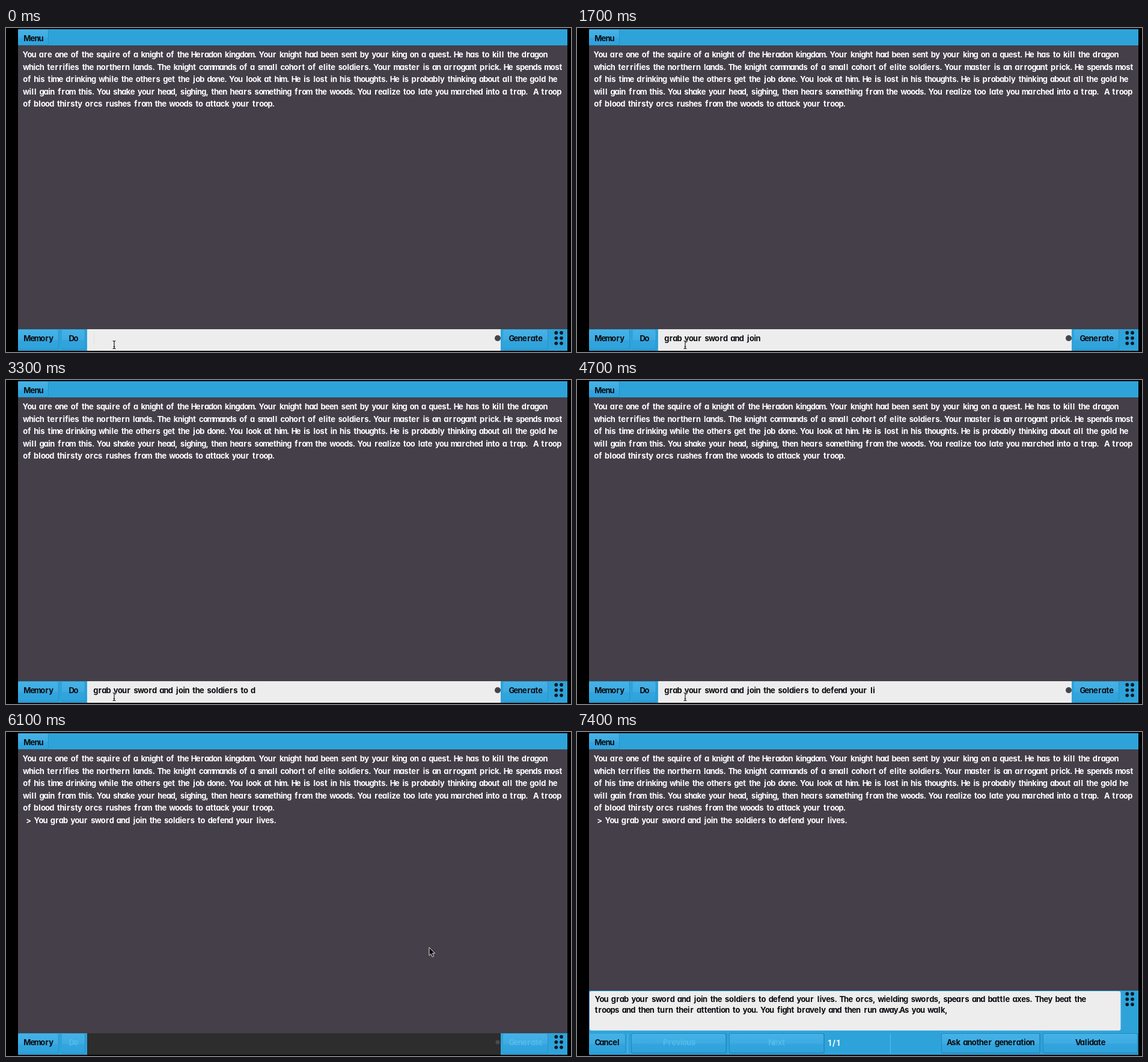
Write an HTML page that moves like this. It is 940 px wide and 540 px high and loops after 9.4 s.

```html
<!DOCTYPE html>
<html lang="en">
<head>
<meta charset="utf-8">
<title>Story generator</title>
<style>
  html, body { margin: 0; width: 100%; height: 100%; overflow: hidden; background: #000; }
  svg { display: block; width: 940px; height: 540px; }
  text {
    font: 700 13px Inter, Roboto, sans-serif;
    font-feature-settings: "cv11", "calt" 0;
    font-variant-ligatures: none;
    text-anchor: middle;
    white-space: pre;
  }
  .light { fill: #fff; }
  .dark { fill: #0b0b10; }
  .off { fill: #55bbeb; }
</style>
</head>
<body>
<svg id="stage" viewBox="0 0 940 540">
  <defs>
    <linearGradient id="gloss" x2="0" y2="1">
      <stop offset="0" stop-color="#45b2e6"/>
      <stop offset=".5" stop-color="#3eace2"/>
      <stop offset=".56" stop-color="#32a5de"/>
      <stop offset="1" stop-color="#2fa2db"/>
    </linearGradient>
  </defs>
  <rect x="20" y="2" width="914" height="536" fill="#443f49"/>
  <rect x="20" y="2" width="914" height="27" fill="#2ea3da"/>
</svg>
<script>
const LOOP = 9400, STEP = 100;
const SUBMIT = 5700, REPLY = 6300, LEAVE = 7200;
const stage = document.getElementById('stage');

// Advance widths of the proportional pixel lettering, in px.
const WIDTHS = [
  [' ', 5.02], ['i.,', 3.5], ['l', 4.5], ['jt', 5], ['f', 5.7],
  ['r', 6.9], ['mw', 9.7], ['M', 11], ['>', 10]
];
const advance = c => (WIDTHS.find(([set]) => set.includes(c)) || [0, 7.18])[1];

function add(parent, tag, attrs) {
  const el = document.createElementNS('http://www.w3.org/2000/svg', tag);
  for (const key in attrs) el.setAttribute(key, attrs[key]);
  parent.append(el);
  return el;
}

const group = () => add(stage, 'g', {});
const show = (el, on) => { el.style.display = on ? '' : 'none'; };

function box(parent, x, y, width, height, fill, rx = 0) {
  return add(parent, 'rect', { x, y, width, height, fill, rx });
}

function label(parent, str, x, y, cls) {
  const xs = [];
  for (const c of str) {
    const w = advance(c);
    xs.push((x + w / 2 - 0.3).toFixed(2));
    x += w;
  }
  const el = add(parent, 'text', { x: xs.join(' '), y, class: cls });
  el.textContent = str;
  return el;
}

function button(parent, x, y, w, h, str, tx, cls = 'dark') {
  box(parent, x, y, w, h, '#2791c6', 2);
  box(parent, x, y, w - 1, h - 1, 'url(#gloss)', 2);
  label(parent, str, tx, y + 19, cls);
}

// Button with a dark rim, as in the reply panel
function framed(parent, x, w, str, tx, cls) {
  box(parent, x - 1, 502, w + 2, 34, '#2488bb', 3);
  button(parent, x, 503, w, 32, str, tx, cls);
}

function dots(parent, top) {
  for (let i = 0; i < 6; i++) {
    add(parent, 'circle', {
      cx: 915.3 + (i % 2) * 8.7, cy: top + (i >> 1) * 8.8, r: 2.9, fill: '#0c1822'
    });
  }
}

// Story text
button(stage, 20, 3, 51, 26, 'Menu', 30);
[
  'You are one of the squire of a knight of the Heradon kingdom. Your knight had been sent by your king on a quest. He has to kill the dragon',
  'which terrifies the northern lands. The knight commands of a small cohort of elite soldiers. Your master is an arrogant prick. He spends most',
  'of his time drinking while the others get the job done. You look at him. He is lost in his thoughts. He is probably thinking about all the gold he',
  'will gain from this. You shake your head, sighing, then hears something from the woods. You realize too late you marched into a trap.  A troop',
  'of blood thirsty orcs rushes from the woods to attack your troop.'
].forEach((line, i) => label(stage, line, 29, 49 + i * 20.5, 'light'));

const ACTION = 'grab your sword and join the soldiers to defend your lives.';
const echo = label(stage, '> You ' + ACTION, 33, 151.5, 'light');

// Prompt bar
const prompt = group();
box(prompt, 20, 502, 914, 36, '#2ea3da');
button(prompt, 20, 503, 68, 33, 'Memory', 30);
dots(prompt, 508);

const ready = group();
button(ready, 93, 503, 39, 33, 'Do', 106);
box(ready, 135, 502, 688, 36, '#ededed');
add(ready, 'circle', { cx: 818, cy: 517, r: 5, fill: '#45454a' });
button(ready, 827, 503, 75, 33, 'Generate', 838);
const caret = box(ready, 146, 510, 1, 15, '#dcdcdc');
const typed = label(ready, ACTION, 146, 521.5, 'dark');

const busy = group();
button(busy, 93, 503, 39, 33, 'Do', 106, 'off');
box(busy, 135, 502, 688, 36, '#2d2d2d');
add(busy, 'circle', { cx: 818, cy: 517, r: 3.5, fill: '#4b4b4f' });
button(busy, 827, 503, 75, 33, 'Generate', 838, 'off');

// Reply panel
const reply = group();
box(reply, 20, 431, 914, 107, '#2ea3da');
box(reply, 21, 432, 883.5, 65.5, '#ededed', 3);
label(reply, 'You ' + ACTION + ' The orcs, wielding swords, spears and battle axes. They beat the', 31, 449.5, 'dark');
label(reply, 'troops and then turn their attention to you. You fight bravely and then run away.As you walk,', 30, 467.5, 'dark');
dots(reply, 436.5);
button(reply, 21, 503, 60, 32, 'Cancel', 31);
framed(reply, 91, 157, 'Previous', 144, 'off');
framed(reply, 254, 157, 'Next', 320, 'off');
label(reply, '1/1', 417, 523, 'light');
framed(reply, 607, 163, 'Ask another generation', 616.5);
framed(reply, 776, 157, 'Validate', 830.5);
box(reply, 84, 503, 1, 33, '#58bdec');
box(reply, 521, 503, 1, 33, '#58bdec');

// Pointers
const beam = group();
const beamPath = 'M-2.5-6.5Q0-6.5 0-5Q0-6.5 2.5-6.5M0-5V5M-2.5 6.5Q0 6.5 0 5Q0 6.5 2.5 6.5M-1.5 3H1.5';
add(beam, 'path', { d: beamPath, fill: 'none', stroke: '#fff', 'stroke-width': 2.6 });
add(beam, 'path', { d: beamPath, fill: 'none', stroke: '#111', 'stroke-width': 1.2 });
const arrow = group();
add(arrow, 'path', {
  d: 'M0 0V13.5L3 10.8L5.2 15.8L7.7 14.7L5.5 9.8H9.6Z',
  fill: '#0a0a0a', stroke: '#e8e8e8', 'stroke-width': 1
});

// Keys are [time, ...values]; values between keys are interpolated.
function track(keys, t, ease = p => p) {
  let i = 0;
  while (i < keys.length - 2 && t >= keys[i + 1][0]) i++;
  const [a, b] = [keys[i], keys[i + 1]];
  const p = ease(Math.min(1, Math.max(0, (t - a[0]) / (b[0] - a[0]))));
  return a.slice(1).map((v, k) => v + (b[k + 1] - v) * p);
}
const smooth = p => p * p * (3 - 2 * p);

const TYPING = [[0, 0], [1700, 24], [3300, 42], [4700, 55], [5100, 59]];
const POINTER = [[5200, 180, 528], [5600, 862, 519], [5700, 862, 519], [6000, 704, 359]];

function draw(now) {
  const t = Math.floor((now % LOOP) / STEP) * STEP;
  const count = Math.floor(track(TYPING, t)[0] + 0.001);
  typed.textContent = ACTION.slice(0, count);

  show(caret, count === 0);
  show(echo, t >= SUBMIT);
  show(ready, t < SUBMIT);
  show(busy, t >= SUBMIT && t < REPLY);
  show(prompt, t < REPLY);
  show(reply, t >= REPLY);

  const [x, y] = track(POINTER, t, smooth);
  const overInput = t < SUBMIT && x < 823 && y > 502;
  show(beam, overInput);
  show(arrow, !overInput && t < LEAVE);
  for (const el of [beam, arrow]) el.setAttribute('transform', `translate(${x} ${y})`);
}

function tick(now) {
  draw(now);
  requestAnimationFrame(tick);
}
tick(0);
</script>
</body>
</html>
```
